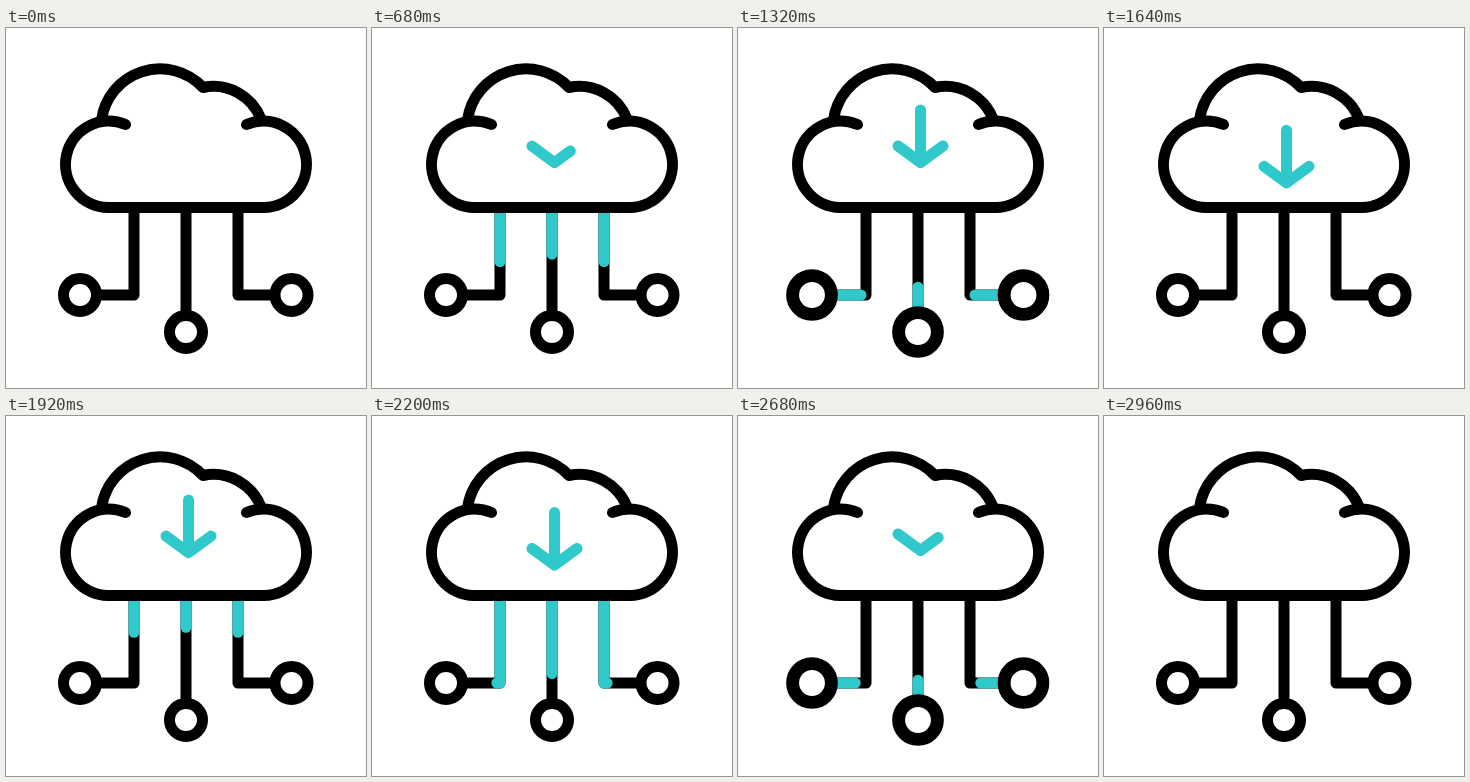
An HTML page for the animation above (3 s loop, 360 by 360 pixels).

```html
<!DOCTYPE html>
<html lang="en">
<head>
<meta charset="utf-8">
<title>Cloud download</title>
<style>
  html, body { margin: 0; width: 100%; height: 100%; overflow: hidden; background: #fff; }
  svg { display: block; width: 100vw; height: 100vh; }
  path, circle { fill: none; stroke: #000; stroke-width: 11; stroke-linecap: round; stroke-linejoin: round; }
  .teal { stroke: #2fc9cb; }
  .node { fill: #fff; }
</style>
</head>
<body>
<svg viewBox="0 0 360 360">
  <g id="wires"></g>
  <g id="nodes"></g>
  <path d="M119.5 96.5A43.2 43.2 0 1 0 102 179.5H258A43.2 43.2 0 1 0 240.5 96.5"/>
  <path d="M95.5 92A59 59 0 0 1 197 59.5A51 51 0 0 1 255 91"/>
  <g id="arrow">
    <path id="head" class="teal" pathLength="1" d="M160 118L182.5 134.5L205 118"/>
    <path id="shaft" class="teal" pathLength="1" d="M182.5 133V82"/>
  </g>
</svg>
<script>
const LOOP = 3000, CYCLE = 1330, FLOW = 635;
const BOUNCE = { start: 666, period: 662, count: 3, height: 20.5 };
const HEAD_SHARE = 0.52;

const $ = id => document.getElementById(id);
const clamp = x => Math.min(1, Math.max(0, x));
const ramp = (t, from, to) => clamp((t - from) / (to - from));
const smooth = x => (1 - Math.cos(Math.PI * x)) / 2;

function add(parent, tag, attrs) {
  const el = document.createElementNS("http://www.w3.org/2000/svg", tag);
  for (const key in attrs) el.setAttribute(key, attrs[key]);
  return parent.appendChild(el);
}

function trim(el, from, to) {
  const len = to - from;
  el.style.display = len > 0.001 ? "" : "none";
  el.style.strokeDasharray = `${len} 3`;
  el.style.strokeDashoffset = -from;
}

const routes = ["M128 180V267H93", "M180 180V285", "M232 180V267H267"];
routes.forEach(d => add($("wires"), "path", { d }));
const flows = routes.map(d => add($("wires"), "path", { d, class: "teal", pathLength: 1 }));
const nodes = [[74, 267], [180, 304], [285.5, 267]].map(([cx, cy]) =>
  add($("nodes"), "circle", { cx, cy, r: 16.5, class: "node" }));

function drawFlow(t) {
  const u = t < 1700 ? t : t - CYCLE;
  const lead = ramp(u, 402, 402 + FLOW);
  const tail = ramp(u, 842, 842 + FLOW);
  flows.forEach(el => trim(el, tail, lead));

  const pulse = smooth(ramp(u, 880, 1270)) - smooth(ramp(u, 1440, 1635));
  const scale = 1 + 0.175 * pulse;
  nodes.forEach(el => {
    el.setAttribute("r", 16.5 * scale);
    el.style.strokeWidth = 11 * scale;
  });
}

function drawArrow(t) {
  const shown = ramp(t, 396, 1040) - ramp(t, 2365, 2955);
  trim($("head"), 0, clamp(shown / HEAD_SHARE));
  trim($("shaft"), 0, clamp((shown - HEAD_SHARE) / (1 - HEAD_SHARE)));

  const beat = Math.min(BOUNCE.count, Math.max(0, (t - BOUNCE.start) / BOUNCE.period));
  $("arrow").setAttribute("transform", `translate(0 ${BOUNCE.height * smooth(2 * beat)})`);
}

const origin = performance.now();
function frame() {
  const t = (performance.now() - origin) % LOOP;
  drawFlow(t);
  drawArrow(t);
  requestAnimationFrame(frame);
}
frame();
</script>
</body>
</html>
```
